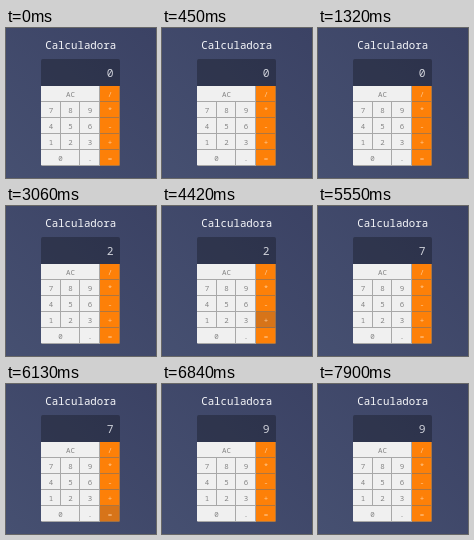
Recreate the animation shown at these times as an HTML page. Size 150 by 150 pixels, loop 8 s.

```html
<!DOCTYPE html>
<html lang="pt">
<head>
<meta charset="utf-8">
<title>Calculadora</title>
<style>
  html, body { margin: 0; width: 100%; height: 100%; overflow: hidden; }
  svg { display: block; width: 100vw; height: 100vh; background: linear-gradient(to top right, #465071, #3b4264); }
  text { font-family: "Noto Sans Mono", "DejaVu Sans Mono", monospace; font-weight: 300; text-anchor: middle; }
  .title { font-size: 10.75px; fill: #f6f7fa; }
  .display { font-size: 11.3px; fill: #d0d2da; }
  .key text { font-size: 7.5px; fill: #858585; }
  .key .face { fill: #f0f0f0; }
  .key .edge { fill: #6e6e6e; opacity: .55; }
  .op .face { fill: #fd8008; }
  .op text { fill: #ffcb98; }
  .pressed .face { fill: #ccc; }
  .op.pressed .face { fill: #d77419; }
</style>
</head>
<body>
<svg viewBox="0 0 150 150">
  <defs><clipPath id="body"><rect x="35" y="31" width="79" height="107" rx="1.7"/></clipPath></defs>
  <text class="title" x="74.7" y="20.8">Calculadora</text>
  <g id="calc" clip-path="url(#body)">
    <rect x="35" y="31" width="79" height="27" fill="#000" fill-opacity=".27"/>
    <text class="display" id="display" x="104.1" y="48.7">0</text>
  </g>
</svg>
<script>
const LOOP = 8000;
const columns = [35, 55, 74, 94, 114];
const rows = [58, 74, 90, 106, 122, 138];
const layout = [
  [['AC', 3], ['/', 1]],
  [['7', 1], ['8', 1], ['9', 1], ['*', 1]],
  [['4', 1], ['5', 1], ['6', 1], ['-', 1]],
  [['1', 1], ['2', 1], ['3', 1], ['+', 1]],
  [['0', 2], ['.', 1], ['=', 1]]
];
const presses = [['+', 4420, 4520], ['7', 5160, 5290], ['=', 6130, 6270]];
const readings = [[0, '0'], [3060, '2'], [5290, '7'], [6270, '9']];

const calc = document.getElementById('calc');
const display = document.getElementById('display');
const keys = {};

function add(parent, tag, attributes, label = '') {
  const node = document.createElementNS('http://www.w3.org/2000/svg', tag);
  for (const name in attributes) node.setAttribute(name, attributes[name]);
  node.textContent = label;
  return parent.appendChild(node);
}

layout.forEach((row, r) => {
  let column = 0;
  for (const [label, span] of row) {
    const x = columns[column], y = rows[r];
    column += span;
    const width = columns[column] - x, height = rows[r + 1] - y;
    const key = add(calc, 'g', { class: column === 4 ? 'key op' : 'key' });
    add(key, 'rect', { class: 'face', x, y, width, height });
    add(key, 'rect', { class: 'edge', x: x + width - 1, y, width: 1, height: height - 1 });
    add(key, 'rect', { class: 'edge', x, y: y + height - 1, width, height: 1 });
    add(key, 'text', { x: x + width / 2, y: y + height / 2 + 2.9 }, label);
    keys[label] = key;
  }
});

function draw(now) {
  const time = now % LOOP;
  display.textContent = readings.filter(([start]) => time >= start).pop()[1];
  for (const [label, start, end] of presses) {
    keys[label].classList.toggle('pressed', time >= start && time < end);
  }
  requestAnimationFrame(draw);
}
draw(0);
</script>
</body>
</html>
```
